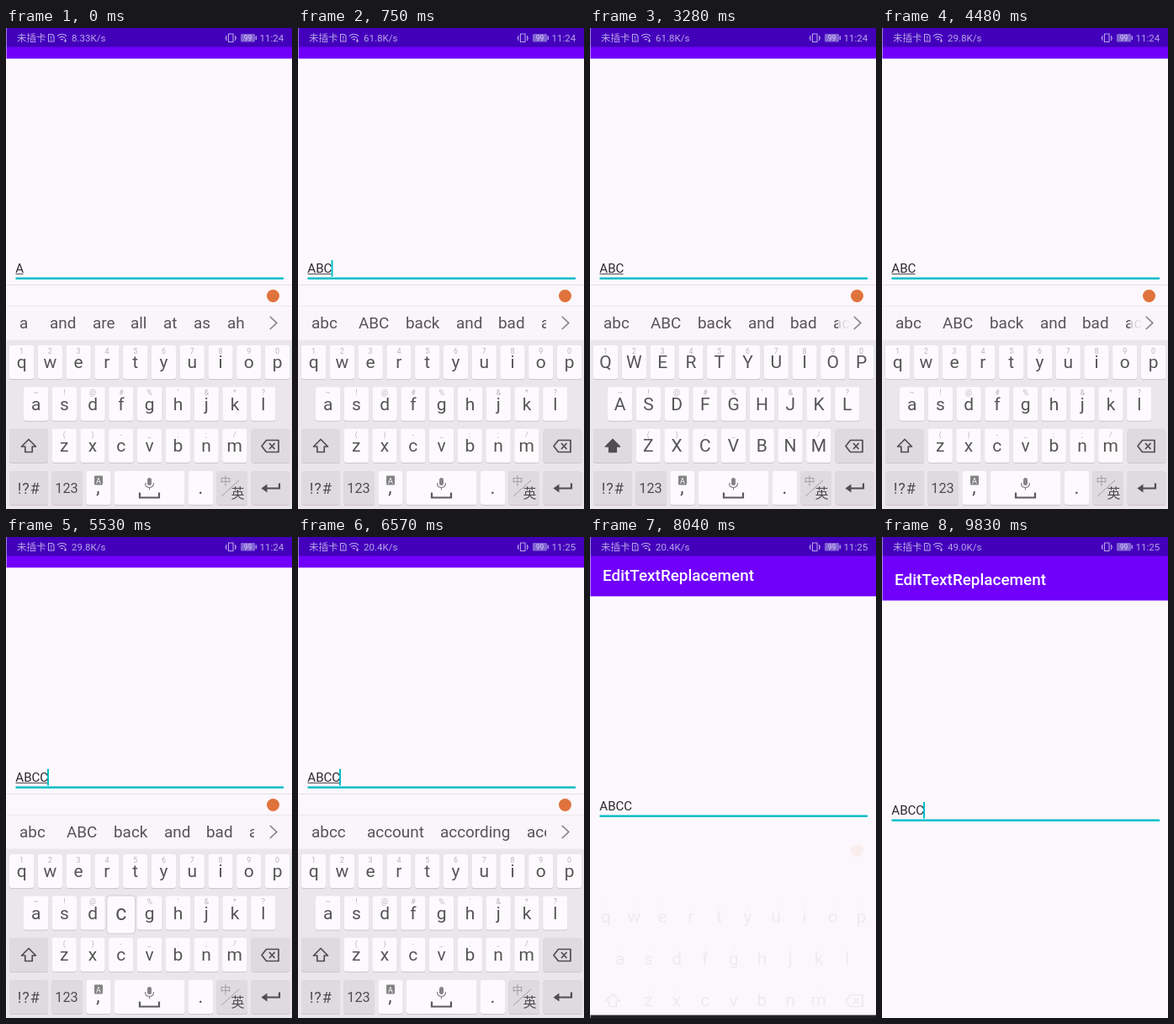
These frames come from a looping animation (340x570 px, 9930 ms). An HTML page:

```html
<!DOCTYPE html>
<html lang="en">
<head>
<meta charset="utf-8">
<title>Text entry</title>
<style>
  html, body { margin: 0; width: 100%; height: 100%; overflow: hidden; background: #fcf8fd; }
  svg { display: block; width: 100vw; height: 100vh; }
  text { font-family: Roboto, "Noto Sans CJK SC", "Noto Sans CJK", sans-serif; white-space: pre; }
  .status { fill: #b9a3e8; font-size: 11.5px; }
  .title { fill: #fff; font-size: 18.9px; font-weight: 500; }
  .field { fill: #2b292c; font-size: 15.1px; }
  .word { fill: #565457; font-size: 18.9px; }
  .key { fill: #fdfafd; }
  .key.fn { fill: #dedadf; }
  .key.down { fill: #c8c4c9; }
  .shade { fill: #cac6cb; }
  .cap { fill: #565457; font-size: 21px; text-anchor: middle; }
  .hint { fill: #b9b5ba; font-size: 9px; text-anchor: middle; }
  .label { fill: #4f4d50; text-anchor: middle; }
  .line { fill: none; stroke: #4f4d50; stroke-width: 1.7; stroke-linejoin: round; }
  .thin { fill: none; stroke: #b9a3e8; stroke-width: 1.1; }
</style>
</head>
<body>
<svg viewBox="0 0 340 570" preserveAspectRatio="none">
  <defs>
    <linearGradient id="fade">
      <stop offset="0" stop-color="#f9f5fa" stop-opacity=".7"/>
      <stop offset="1" stop-color="#f9f5fa"/>
    </linearGradient>
  </defs>
  <rect width="340" height="570" fill="#111014"/>

  <g id="app">
    <rect y="-39" width="340" height="571.5" fill="#fcf8fd"/>
    <rect y="-39" width="340" height="75.3" fill="#7100fb"/>
    <text class="title" x="15" y="17.5">EditTextReplacement</text>
    <text class="field" id="field" x="11.3" y="290"></text>
    <rect id="compose" x="11.5" y="291" height="1" fill="#4a484b"/>
    <rect x="11.5" y="295.5" width="318.5" height="2.5" fill="#00bfc9"/>
    <rect id="cursor" y="275" width="2" height="19.5" fill="#00bfc9"/>
  </g>

  <g>
    <rect width="340" height="22.5" fill="#4300bb"/>
    <text class="status" x="13" y="16">未插卡</text>
    <path class="thin" d="M50.5 7.5h4.5l2 2v6.5h-6.5z M53.7 9.5v3 M53.7 13.5v1.2"/>
    <path class="thin" d="M61 9.5q5.5-4.5 11 0 M63 11.8q3.5-2.8 7 0 M65 14q1.5-1.3 3 0"/>
    <path class="thin" d="M70.5 12.5v3.5m-1.3-1.2l1.3 1.3l1.3-1.3"/>
    <text class="status" id="speed" x="78" y="16"></text>
    <path class="thin" d="M264.5 7h5.5v9.5h-5.5z M262 9v2l-1 1l1 1v2 M272.5 9v2l1 1l-1 1v2"/>
    <rect x="279" y="7" width="17" height="9.5" rx="1.2" fill="#8063d2"/>
    <rect x="296.6" y="9.5" width="1.4" height="4.5" fill="#b9a3e8"/>
    <text x="287.5" y="15" font-size="8.5" text-anchor="middle" fill="#d9cdf5">99</text>
    <text class="status" id="clock" x="301.5" y="16"></text>
  </g>

  <g id="board">
    <rect y="304" width="340" height="270" fill="#fbf7fc"/>
    <rect y="304" width="340" height="1" fill="#e3dfe4"/>
    <rect y="329" width="340" height="41" fill="#f9f5fa"/>
    <rect y="329" width="340" height="1" fill="#ece8ed"/>
    <circle cx="317.5" cy="317.5" r="7.5" fill="#e0733c"/>
    <g id="bar">
      <g id="words"></g>
      <rect id="soft" x="295" y="335" width="16" height="30" fill="url(#fade)"/>
      <rect id="edge" y="335" height="30" width="45" fill="#f9f5fa"/>
      <path d="M313.8 342l8 7.5l-8 7.5" fill="none" stroke="#858386" stroke-width="1.7"/>
    </g>
    <g id="plate">
      <rect y="369.5" width="340" height="202" fill="#eae6eb"/>
    </g>
    <g id="letters"></g>

    <path id="arrow" class="line" d="M27 487.5l8.5 8.5h-4.3v6.5h-8.4v-6.5h-4.3z"/>
    <path class="line" d="M304 495.5l5.5-7h14.5v14h-14.5z M313 492l6.5 7 M319.5 492l-6.5 7"/>
    <text class="label" x="27.3" y="551.5" font-size="18" letter-spacing="1">!?#</text>
    <text class="label" x="72" y="551" font-size="16.3">123</text>
    <rect x="105" y="530.5" width="10" height="11" rx="1" fill="#858386"/>
    <text x="110" y="539.5" font-size="9" text-anchor="middle" fill="#fff">A</text>
    <text class="label" x="109.5" y="551" font-size="22">,</text>
    <rect x="168" y="533" width="5" height="9" rx="2.5" fill="#858386"/>
    <path d="M165.5 539q0 5.5 5 5.5t5-5.5M170.5 544.5v3" fill="none" stroke="#858386" stroke-width="1.2"/>
    <path d="M159 550.5v6h23v-6" fill="none" stroke="#5d5b5e" stroke-width="2.2"/>
    <text class="label" x="231.5" y="552" font-size="22">.</text>
    <text class="label" x="261" y="541" font-size="13" style="fill:#a09ca1">中</text>
    <path d="M256 555l21-19" stroke="#a09ca1" stroke-width="1"/>
    <text class="label" x="275.5" y="557" font-size="16">英</text>
    <path d="M325 539.5v6h-17" fill="none" stroke="#4f4d50" stroke-width="2.2"/>
    <path d="M303.5 545.5l7-5v10z" fill="#4f4d50"/>

    <g id="popup">
      <rect x="-17" y="425" width="34" height="45" rx="4" fill="#fdfafd" stroke="#cfcbd0"/>
      <text class="cap" id="bubble" y="454" style="font-size:25px"></text>
    </g>
  </g>
  <rect width="1" height="570" fill="#fcf8fd" opacity=".5"/>
</svg>
<script>
const LOOP = 9930, PITCH = 33.77;
const $ = id => document.getElementById(id);
const make = (parent, tag, attrs, text = '') => {
  const el = document.createElementNS('http://www.w3.org/2000/svg', tag);
  for (const k in attrs) el.setAttribute(k, attrs[k]);
  el.textContent = text;
  return parent.appendChild(el);
};

// Keyboard
const caps = [], keyBox = {};
function addKey(name, x, y, w, fn) {
  make($('plate'), 'rect', { class: 'shade', x, y: y + 1, width: w, height: 40, rx: 3 });
  keyBox[name] = make($('plate'), 'rect',
    { class: fn ? 'key fn' : 'key', x, y, width: w, height: 40, rx: 3 });
}
[
  ['qwertyuiop', '1234567890', 4, 376],
  ['asdfghjkl', "~!@#%'&*?", 21, 425.6],
  ['zxcvbnm', '()-_:;/', 54.6, 475]
].forEach(([letters, hints, left, y]) => [...letters].forEach((c, i) => {
  const x = left + i * PITCH, mid = x + 14.6;
  addKey(c, x, y, 29.2);
  make($('letters'), 'text', { class: 'hint', x: mid, y: y + 9.8 }, hints[i]);
  caps.push(make($('letters'), 'text', { class: 'cap', x: mid, y: y + 27 }, c));
}));
[
  ['shift', 4, 475, 46, 1], ['delete', 291.5, 475, 46, 1], ['symbols', 4, 525, 46, 1],
  ['digits', 54.5, 525, 36.5, 1], ['comma', 95.5, 525, 29], ['space', 129, 525, 83.5],
  ['stop', 217, 525, 29], ['lang', 250.5, 525, 36.5, 1], ['enter', 291.5, 525, 46, 1]
].forEach(k => addKey(...k));

// Timeline: [start, value], each held until the next
const typed = [[0, 'A'], [150, 'AB'], [600, 'ABC'], [5530, 'ABCC']];
const cursorX = [0, 20.5, 29.8, 39.5, 49];
const speeds = [[0, '8.33K/s'], [750, '61.8K/s'], [3730, '29.8K/s'], [6570, '20.4K/s'], [9690, '49.0K/s']];
const words = [
  [0, [[16, 'a'], [52, 'and'], [103, 'are'], [148, 'all'], [187, 'at'], [223, 'as'], [263, 'ah']]],
  [300, [[16, 'ab'], [62, 'AB'], [112, 'about'], [187, 'able'], [254, 'above']]],
  [750, [[16, 'abc'], [72, 'ABC'], [128, 'back'], [188, 'and'], [238, 'bad'], [289, 'according']]],
  [5680, [[16, 'abcc'], [82, 'account'], [169, 'according'], [272, 'accept']]]
];
const popups = [[0, ''], [150, 'b'], [300, ''], [600, 'c'], [750, ''], [5530, 'c'], [5680, '']];
const blink = [150, 1190, 1790, 2240, 2690, 3280, 3730, 4180, 4780, 5230,
  5530, 5980, 6570, 7310, 8190, 8340, 8940, 9390, 9830];
const presses = [2540, 2690, 2980, 3130, 4330, 4480];
// [start, app offset, keyboard offset, keyboard opacity, key plate opacity]
const slide = [[0, 0, 0, 1, 1], [7900, 9, 16, .65, 1], [8040, 34, 54, .08, 0], [8190, 39, 60, 0, 0]];

const entry = (list, t) => list.filter(e => e[0] <= t).pop();
const at = (list, t) => entry(list, t)[1];
const isOn = (flips, t) => flips.filter(f => f <= t).length % 2 === 1;
const show = (id, on) => $(id).setAttribute('visibility', on ? 'visible' : 'hidden');

let shownWords;
function setWords(list) {
  if (list === shownWords) return;
  shownWords = list;
  $('words').textContent = '';
  for (const [x, word] of list) make($('words'), 'text', { class: 'word', x, y: 356 }, word);
}

function draw(t) {
  const text = at(typed, t), x = cursorX[text.length];
  $('field').textContent = text;
  $('cursor').setAttribute('x', x);
  $('compose').setAttribute('width', x - 11.5);
  show('compose', t < 6860);
  show('cursor', isOn(blink, t));
  $('speed').textContent = at(speeds, t);
  $('clock').textContent = t < 5680 ? '11:24' : '11:25';

  setWords(at(words, t));
  const soft = t >= 2540 && t < 5530;
  $('bar').style.display = t < 6860 ? '' : 'none';
  $('edge').setAttribute('x', soft ? 311 : 295);
  show('soft', soft);

  const upper = t >= 2690 && t < 4480;
  for (const c of caps) c.textContent = upper ? c.textContent.toUpperCase() : c.textContent.toLowerCase();
  keyBox.shift.classList.toggle('down', isOn(presses, t));
  $('arrow').style.fill = upper ? '#4f4d50' : 'none';

  const pop = at(popups, t);
  $('popup').style.display = pop ? '' : 'none';
  if (pop) {
    $('bubble').textContent = pop;
    const mid = +keyBox[pop].getAttribute('x') + 14.6;
    $('popup').setAttribute('transform', `translate(${mid} 0)`);
  }
  keyBox.c.classList.toggle('down', t >= 600 && t < 750);

  const [, pan, drop, alpha, plate] = entry(slide, t);
  $('app').setAttribute('transform', `translate(0 ${pan})`);
  $('board').setAttribute('transform', `translate(0 ${drop})`);
  $('board').setAttribute('opacity', alpha);
  $('plate').setAttribute('opacity', plate);
}

const start = performance.now();
function tick() {
  draw((performance.now() - start) % LOOP);
  requestAnimationFrame(tick);
}
tick();
</script>
</body>
</html>
```
